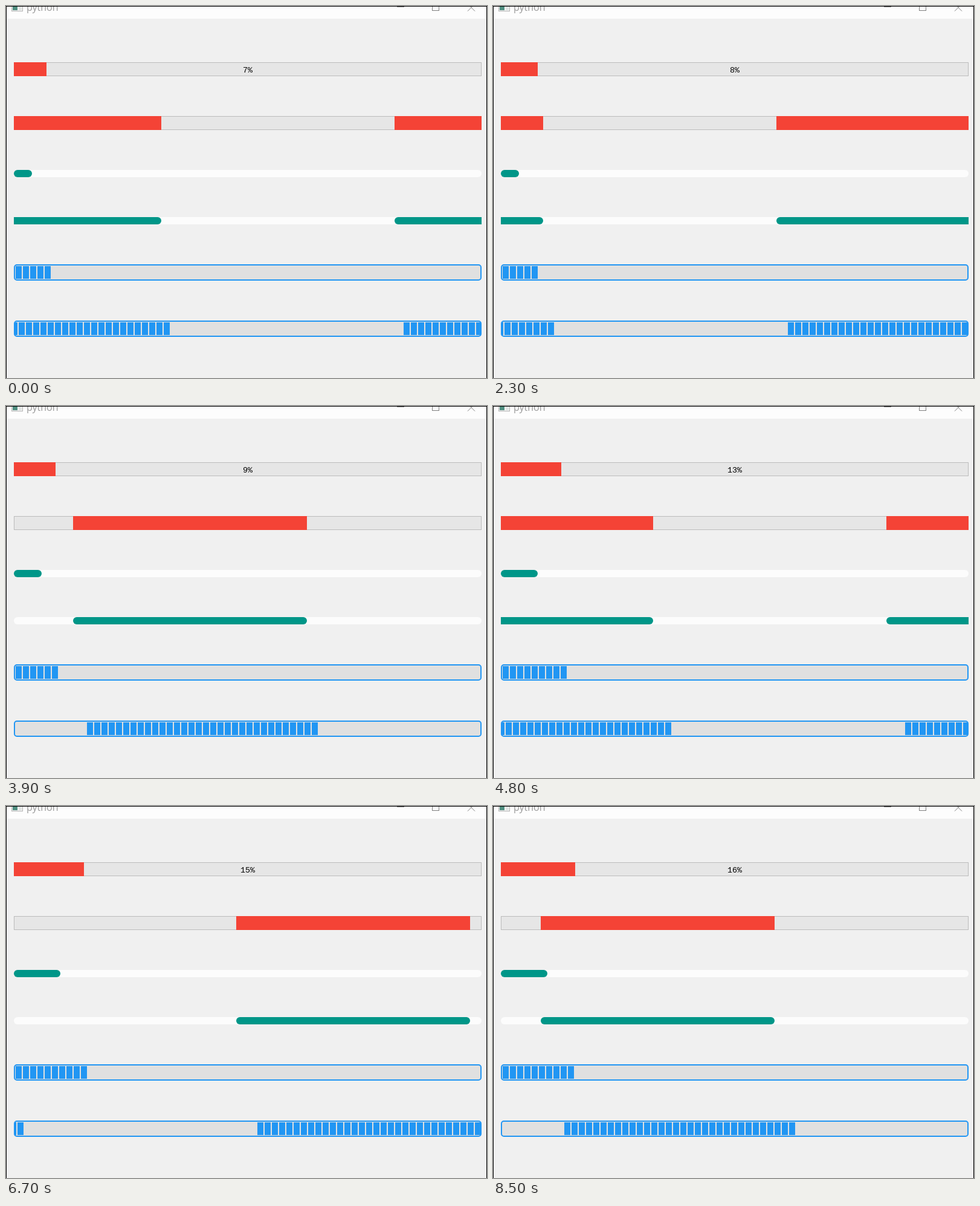
Animation of 796 by 615 pixels, one loop 8.6 s. Source, as an HTML page:

```html
<!DOCTYPE html>
<html lang="en">
<head>
<meta charset="utf-8">
<title>Progress bars</title>
<style>
  html, body { margin: 0; width: 100%; height: 100%; overflow: hidden; background: #f0f0f0; }
  #stage { display: block; }
  .title { font: 16px "Open Sans", "Noto Sans", sans-serif; fill: #999; }
  .percent { font: 13.333px "Liberation Mono", "Noto Sans Mono", monospace; text-anchor: middle; }
  .groove { fill: #e6e6e6; stroke: #bcbcbc; }
  .red { fill: #f44336; }
  .track { fill: #fcfcfc; }
  .teal { fill: #009688; }
  .frame { fill: #e0e0e0; stroke: #2196f3; stroke-width: 2; }
  .blue { fill: #2196f3; }
  .buttons { fill: none; stroke: #808080; }
</style>
</head>
<body>
<svg id="stage" width="796" height="615" viewBox="0 0 796 615">
  <rect width="796" height="615" fill="#f0f0f0"/>
  <rect width="796" height="21" fill="#fdfdfd"/>

  <!-- title bar -->
  <rect x="9.5" y="-5.5" width="18" height="14" fill="#f4f4f4" stroke="#b4b4b4"/>
  <rect x="11" y="0" width="8" height="7" fill="#4f8f80"/>
  <rect x="21" y="0" width="5" height="7" fill="#e2e6e4"/>
  <text class="title" x="34" y="8">python</text>
  <g class="buttons">
    <path d="M647 1.5h12"/>
    <rect x="705.5" y="-3.5" width="11" height="11"/>
    <path d="M764-3.5l12 12M776-3.5l-12 12"/>
  </g>

  <!-- red bars -->
  <rect class="groove" x="13.5" y="93.5" width="773" height="22"/>
  <rect class="red" id="redFill" x="13" y="93" height="23"/>
  <text class="percent" id="percent" x="400" y="110"></text>
  <rect class="groove" x="13.5" y="182.5" width="773" height="22"/>
  <svg x="13" y="182" width="774" height="23">
    <rect class="red lead" width="387" height="23"/>
    <rect class="red wrap" width="387" height="23"/>
  </svg>

  <!-- teal bars -->
  <rect class="track" x="13" y="271" width="774" height="12" rx="6"/>
  <rect class="teal" id="tealFill" x="13" y="271" height="12" rx="6"/>
  <rect class="track" x="13" y="349" width="774" height="12" rx="6"/>
  <svg x="13" y="349" width="774" height="12">
    <rect class="teal lead" width="387" height="12" rx="6"/>
    <rect class="teal wrap" width="387" height="12" rx="6"/>
  </svg>

  <!-- blue bars -->
  <rect class="frame" x="14" y="428" width="772" height="25" rx="4"/>
  <svg x="15" y="430" width="770" height="21"><path class="blue" id="blueFill"/></svg>
  <rect class="frame" x="14" y="521" width="772" height="25" rx="4"/>
  <svg x="15" y="523" width="770" height="21"><path class="blue" id="blueBusy"/></svg>

  <path d="M0 .5H796M.5 0V615M795.5 0V615" stroke="#000"/>
</svg>
<script>
const LOOP = 8600, TICK = 100, WIDTH = 774, INNER = 770, PITCH = 12, STRIDE = 8;

// time, percent of red bar, percent of teal bar, blue blocks
const values = [
  [0, 7, 4, 5], [1200, 8, 4, 5], [3000, 9, 6, 6], [4100, 13, 8, 9],
  [4900, 14, 8, 9], [6700, 15, 10, 10], [8500, 16, 10, 10]
];

// time, busy step; the busy bars skip ahead at 4100
const busy = [
  [0, 369], [1500, 418], [1800, 427], [3100, 470], [4000, 499], [4100, 734],
  [4800, 757], [5400, 778], [5900, 794], [6300, 806], [7500, 847], [8500, 879]
];

const $ = id => document.getElementById(id);
const setX = (selector, x) =>
  document.querySelectorAll(selector).forEach(el => el.setAttribute('x', x));

const blocks = (x, count) =>
  Array.from({ length: count }, (_, i) => `M${x + 1 + i * PITCH} 0h10v21h-10z`).join('');

function busyStep(t) {
  const i = Math.max(1, busy.findIndex(key => key[0] >= t));
  const [t0, s0] = busy[i - 1], [t1, s1] = busy[i];
  return Math.round(s0 + (s1 - s0) * (t - t0) / (t1 - t0));
}

function draw(t) {
  const [, red, teal, count] = values.filter(row => row[0] <= t).pop();
  $('redFill').setAttribute('width', Math.floor(WIDTH * red / 100));
  $('tealFill').setAttribute('width', Math.floor(WIDTH * teal / 100));
  $('percent').textContent = red + '%';
  $('blueFill').setAttribute('d', blocks(0, count));

  const travel = busyStep(t) * STRIDE;
  const x = travel % WIDTH, bx = travel % INNER;
  setX('.lead', x);
  setX('.wrap', x - WIDTH + 1);
  $('blueBusy').setAttribute('d', blocks(bx, 32) + blocks(bx - INNER + 1, 32));
}

const start = performance.now();
function loop(now) {
  const t = Math.max(0, now - start) % LOOP;
  draw(Math.floor(t / TICK) * TICK);
  requestAnimationFrame(loop);
}
draw(0);
requestAnimationFrame(loop);
</script>
</body>
</html>
```
